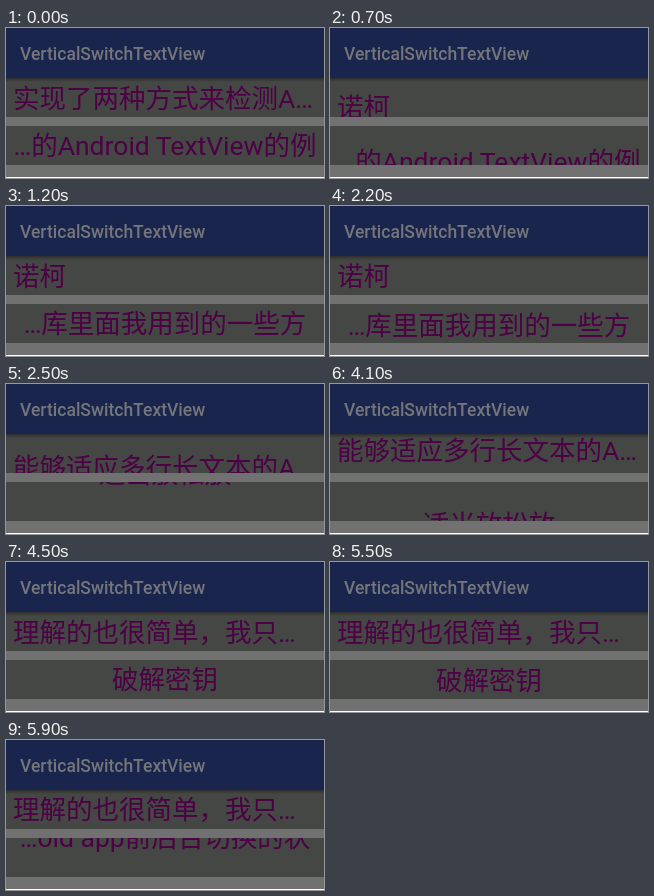
Write an HTML page that moves like this. It is 318x150 px and loops after 6 s.

```html
<!DOCTYPE html>
<html lang="zh-CN">
<head>
<meta charset="utf-8">
<style>
  html, body { margin: 0; width: 100%; height: 100%; overflow: hidden; background: #717171; }
  svg { display: block; width: 318px; height: 150px; }
  .title { font: 500 17.5px Roboto, sans-serif; fill: #74767a; }
  .line { font: 26.5px Roboto, "Noto Sans CJK SC", "Noto Sans CJK", sans-serif; fill: #4e0046; }
</style>
</head>
<body>
<svg viewBox="0 0 318 150">
  <defs>
    <clipPath id="upperClip"><rect y="50" width="318" height="39"/></clipPath>
    <clipPath id="lowerClip"><rect y="98" width="318" height="39"/></clipPath>
    <linearGradient id="shadow" x2="0" y2="1">
      <stop stop-opacity=".35"/>
      <stop offset="1" stop-opacity="0"/>
    </linearGradient>
  </defs>
  <rect width="318" height="150" fill="#717171"/>
  <rect y="50" width="318" height="39" fill="#454745"/>
  <rect y="98" width="318" height="39" fill="#454745"/>
  <rect y="50" width="318" height="4" fill="url(#shadow)"/>
  <rect width="318" height="50" fill="#1a254e"/>
  <rect y="149" width="318" height="1" fill="#fff"/>
  <text class="title" x="14" y="32">VerticalSwitchTextView</text>
  <g clip-path="url(#upperClip)"><text id="upper" class="line" x="7"></text></g>
  <g clip-path="url(#lowerClip)"><text id="lower" class="line" x="159" text-anchor="middle"></text></g>
</svg>
<script>
  const LOOP = 6000;
  const STEP = 100;
  const TRAVEL = 59;

  const switchers = [
    {
      node: document.getElementById('upper'),
      baseline: 80.3, direction: -1, start: 380, period: 1825, duration: 430,
      lines: ['实现了两种方式来检测A…', '诺柯', '能够适应多行长文本的A…', '理解的也很简单，我只…']
    },
    {
      node: document.getElementById('lower'),
      baseline: 127.4, direction: 1, start: 443, period: 1668, duration: 750,
      lines: ['…的Android TextView的例', '…库里面我用到的一些方', '适当放松放', '破解密钥', '…oid app前后台切换的状']
    }
  ];

  const ease = x => (1 - Math.cos(Math.PI * Math.min(1, x))) / 2;

  // The old line leaves during the first half, the new one enters during the second.
  function drawSwitcher(s, time) {
    const cycle = Math.floor((time - s.start) / s.period);
    const value = cycle < 0 ? 1 : ease((time - s.start - cycle * s.period) / s.duration);
    const leaving = value < 0.5;
    const index = Math.min(s.lines.length - 1, leaving ? cycle : cycle + 1);
    const shift = s.direction * TRAVEL * (leaving ? value : value - 1);
    s.node.textContent = s.lines[index];
    s.node.setAttribute('y', s.baseline + Math.round(shift * 2) / 2);
  }

  const origin = performance.now();

  function frame() {
    const elapsed = (performance.now() - origin) % LOOP;
    const time = Math.floor(elapsed / STEP) * STEP;
    switchers.forEach(s => drawSwitcher(s, time));
    requestAnimationFrame(frame);
  }
  frame();
</script>
</body>
</html>
```
